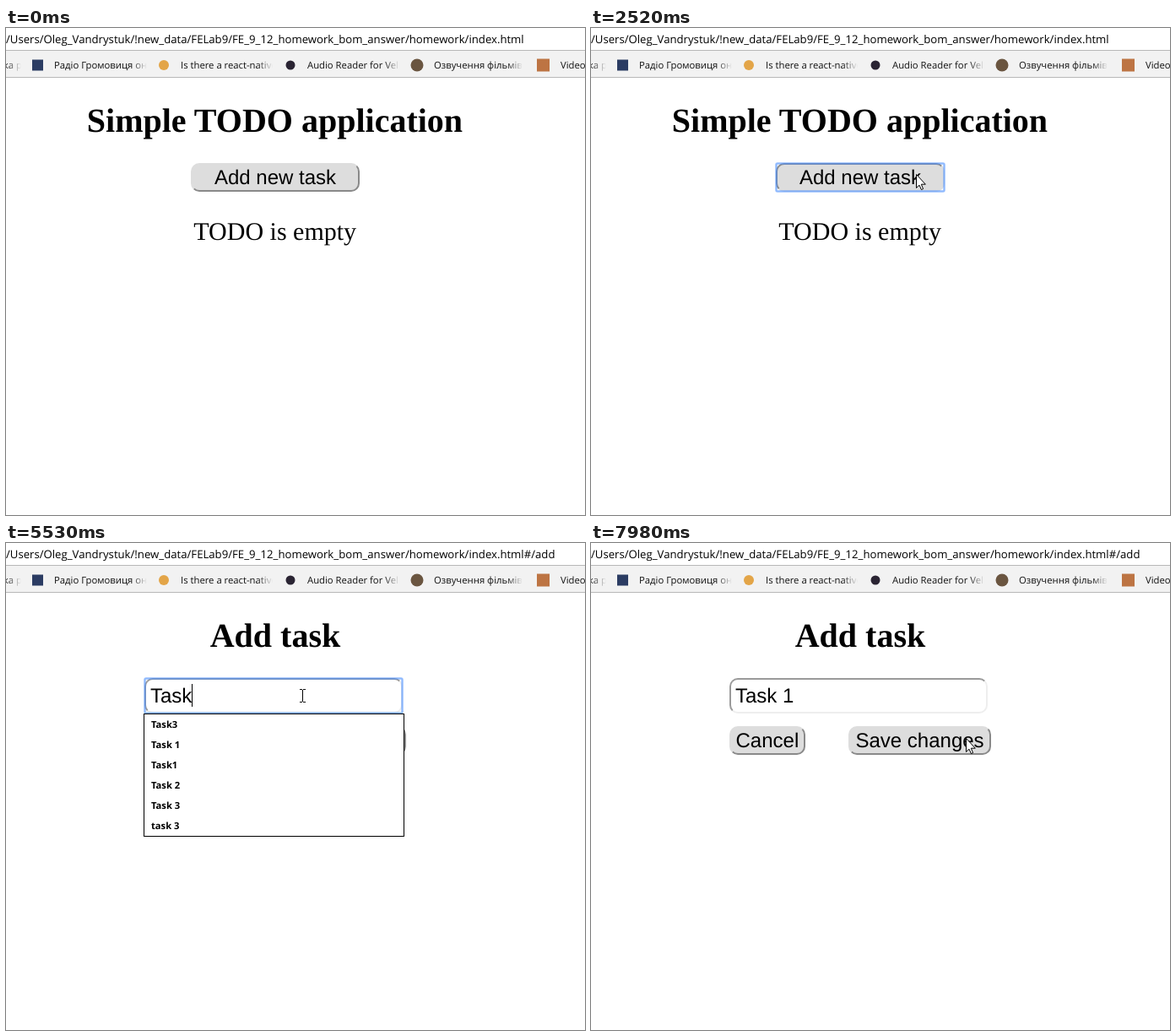
These frames come from a looping animation (686 px wide and 577 px high, 8000 ms). An HTML page:

```html
<!DOCTYPE html>
<html lang="en">
<head>
<meta charset="utf-8">
<title>TODO</title>
<style>
html, body { margin: 0; width: 100%; height: 100%; overflow: hidden; background: #fff; }
.box { position: absolute; box-sizing: border-box; border: 2px solid; border-radius: 10px; }
.btn { background: #ddd; border-color: #ddd #898989 #898989 #ddd; }
.btn.down { border-color: #898989 #ddd #ddd #898989; }
.field { background: #fff; border-color: #9a9a9a #eee #eee #9a9a9a; }
svg { position: absolute; left: 0; top: 0; }
text { white-space: pre; text-rendering: geometricPrecision; }
.ui { font: 11.3px "Open Sans", "Noto Sans", sans-serif; fill: #111; }
.url { font: 13.16px "Open Sans", "Noto Sans", sans-serif; }
.h1 { font: bold 40px "Liberation Serif", serif; }
.p { font: 30px "Liberation Serif", serif; }
.label { font: 24px "Liberation Sans", Arial, sans-serif; }
.item { font: bold 11.2px "Open Sans", "Noto Sans", sans-serif; }
</style>
</head>
<body>
<div id="homeBoxes">
  <div id="addBtn" class="box btn" style="left:219px;top:160px;width:200px;height:34px"></div>
</div>
<div id="addBoxes">
  <div class="box field" style="left:164px;top:160px;width:306px;height:42px"></div>
  <div class="box btn" style="left:164px;top:217px;width:90px;height:34px"></div>
  <div class="box btn" style="left:305px;top:217px;width:169px;height:34px"></div>
</div>
<svg width="686" height="577" viewBox="0 0 686 577">
  <defs>
    <linearGradient id="fade">
      <stop offset="0" stop-color="#f2f2f2" stop-opacity="0"/>
      <stop offset="1" stop-color="#f2f2f2"/>
    </linearGradient>
  </defs>
  <text id="url" class="url" x="0" y="18"></text>
  <rect y="26" width="686" height="33" fill="#b8b8b8"/>
  <rect y="27" width="686" height="31" fill="#f2f2f2"/>
  <g id="marks"></g>
  <g id="home">
    <text class="h1" x="95.8" y="123">Simple TODO application</text>
    <text class="label" x="247" y="185">Add new task</text>
    <text class="p" x="222.3" y="251">TODO is empty</text>
  </g>
  <g id="add">
    <text class="h1" x="241.7" y="123">Add task</text>
    <text class="label" x="171.5" y="242">Cancel</text>
    <text class="label" x="313.5" y="242">Save changes</text>
    <text id="value" class="label" x="171" y="189"></text>
    <rect id="caret" y="167" width="1" height="27"/>
  </g>
  <g id="ring" fill="none" stroke="#4d90fe">
    <rect rx="1.5" stroke-width="3" stroke-opacity=".25"/>
    <rect rx="1.5" stroke-width="2" stroke-opacity=".5"/>
  </g>
  <g id="popup">
    <rect id="frame" x="163.5" y="202.5" width="308" fill="#fff" stroke="#000"/>
    <g id="items"></g>
  </g>
  <path id="arrow" d="M.5 .5V16.5L4 13.2 6.4 18.5 8.6 17.6 6.3 12.2H11.3Z" fill="#fff" stroke="#000"/>
  <path id="beam" d="M-3 0h3v1h1v-1h3v1h-3v14h3v1h-3v-1h-1v1h-3v-1h3v-14h-3z" shape-rendering="crispEdges"/>
</svg>
<script>
const LOOP = 8000, TICK = 70;
const OPEN = 2660, FOCUS = 3780, BLUR = 7420;
const $ = id => document.getElementById(id);
const path = "/Users/Oleg_Vandrystuk/!new_data/FELab9/FE_9_12_homework_bom_answer/homework/index.html";

// text x, text, clip end
const marks = [
  [-3, "ка ра", 18],
  [57, "Радіо Громовиця онлайн", 167],
  [207, "Is there a react-native", 316],
  [357, "Audio Reader for Velnor", 466],
  [507, "Озвучення фільмів", 612],
  [657, "Video", 720]
];
const dot = (x, r, fill) => `<circle cx="${x}" cy="44" r="${r}" fill="${fill}"/>`;
const tile = (x, size, fill) =>
  `<rect x="${x}" y="${44 - size / 2}" width="${size}" height="${size}" fill="${fill}"/>`;
$("marks").innerHTML = marks.map(([x, text, end]) =>
  `<text class="ui" x="${x}" y="48">${text}</text>` +
  `<rect x="${end - 18}" y="32" width="18" height="22" fill="url(#fade)"/>` +
  `<rect x="${end}" y="32" width="30" height="22" fill="#f2f2f2"/>`).join("") +
  tile(31, 13, "#2b3c63") + dot(187, 6, "#e3a548") + dot(337, 5.5, "#2a2433") +
  dot(487, 7.5, "#6a5540") + tile(629, 15, "#bd7443");

// start time, steps, x, y
const moves = [
  [490, 1, 558, 459], [560, 1, 466, 254], [840, 2, 416, 198],
  [1190, 7, 386, 179], [1750, 2, 385, 173], [OPEN, 1, 387, 166],
  [3290, 4, 351, 173], [6860, 3, 552, 223], [7840, 3, 444, 231]
];
const typed = [[0, ""], [4550, "T"], [4970, "Ta"], [5460, "Tas"], [5530, "Task"], [6020, "Task "], [6230, "Task 1"]];
const lists = [
  [0, "12345,Task3,asdf,Task 1,Task1,task 3"],
  [4550, "Task3,Task 1,Task1,Task 2,Task 3,task 3"],
  [6020, "Task 1,Task 2,Task 3,task 3,task 1,task 2"],
  [6230, "Task 1,task 1"]
];
const caretOn = [[FOCUS, 4270], [4550, 6720], [7210, BLUR]];

const within = (t, a, b) => t >= a && t < b;
const latest = (rows, t) => rows.filter(r => r[0] <= t).pop()[1];
const show = (id, on) => { $(id).style.display = on ? "" : "none"; };

function pointer(t) {
  let x = 558, y = 459;
  for (const [start, steps, tx, ty] of moves) {
    if (t < start) break;
    const k = Math.min(1, (Math.floor((t - start) / TICK) + 1) / steps);
    x += (tx - x) * k;
    y += (ty - y) * k;
  }
  return [Math.round(x), Math.round(y)];
}

function setRing(x, y, w, h) {
  for (const r of $("ring").children)
    Object.entries({ x, y, width: w, height: h }).forEach(([k, v]) => r.setAttribute(k, v));
}

function render(t) {
  const adding = t >= OPEN, focused = within(t, FOCUS, BLUR), pressed = within(t, 2520, OPEN);
  show("home", !adding);
  show("homeBoxes", !adding);
  show("add", adding);
  show("addBoxes", adding);
  $("url").textContent = path + (adding ? "#/add" : "");
  $("addBtn").classList.toggle("down", pressed);

  show("ring", pressed || focused);
  if (pressed) setRing(219.5, 160.5, 199, 33);
  else setRing(164.5, 160.5, 305, 41);

  const value = $("value");
  value.textContent = latest(typed, t);
  show("caret", caretOn.some(([a, b]) => within(t, a, b)));
  const width = adding && value.textContent ? value.getComputedTextLength() : 0;
  $("caret").setAttribute("x", 171 + Math.floor(width));

  show("popup", focused);
  const rows = latest(lists, t).split(",");
  $("frame").setAttribute("height", rows.length * 24 + 1);
  $("items").innerHTML = rows.map((s, i) =>
    `<text class="item" x="172" y="${219 + i * 24}">${s}</text>`).join("");

  const [x, y] = pointer(t), beam = adding && x < 470 && y < 202;
  show("arrow", t >= 490 && !beam);
  show("beam", beam);
  $(beam ? "beam" : "arrow").setAttribute("transform", `translate(${x} ${y})`);
}

const begin = performance.now();
function loop() {
  render((performance.now() - begin) % LOOP);
  requestAnimationFrame(loop);
}
loop();
</script>
</body>
</html>
```
